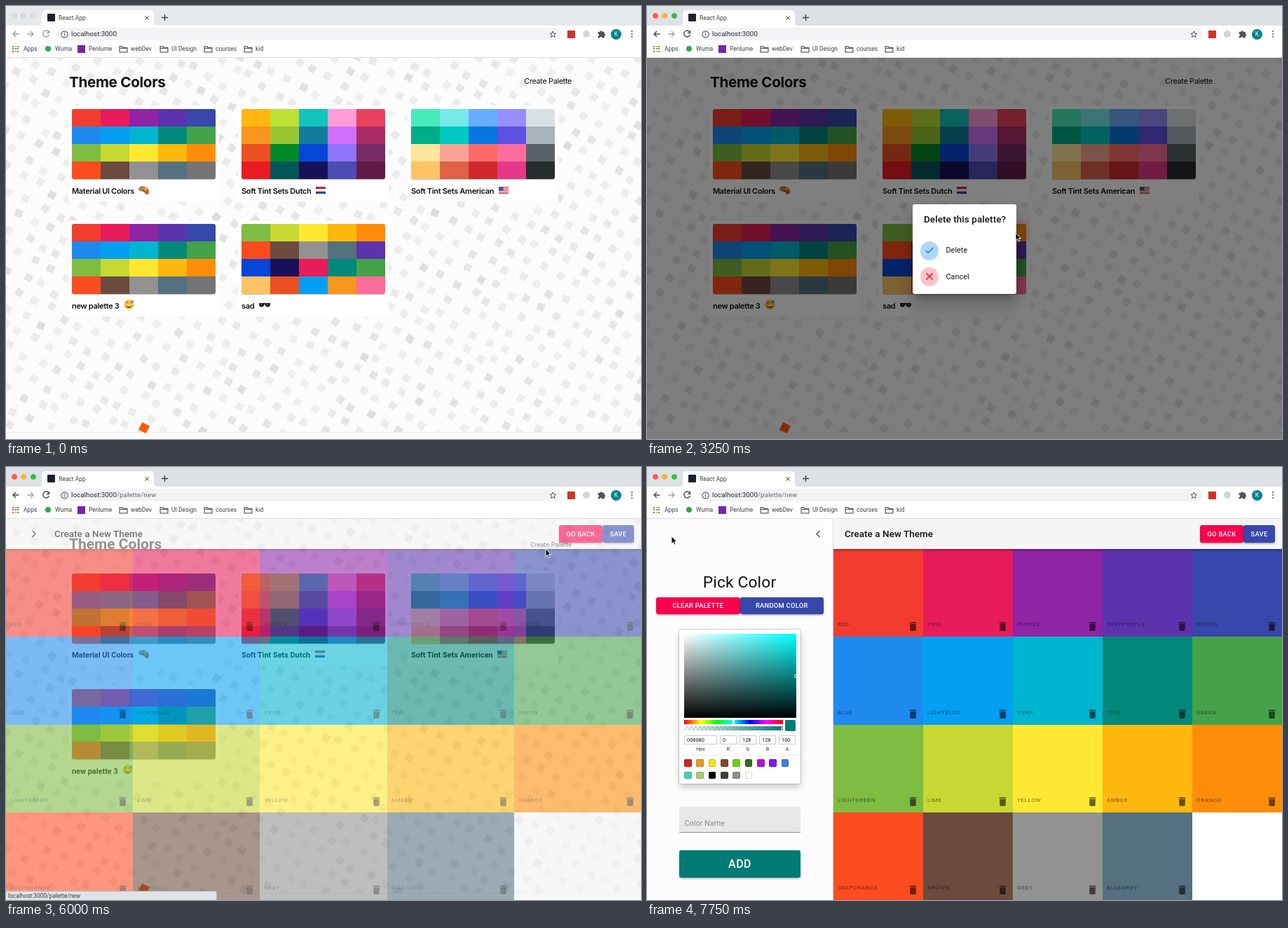
Animation, 906 px wide and 618 px high, one loop 8 s. Source, as an HTML page with a canvas:

```html
<!DOCTYPE html>
<html lang="en">
<head>
<meta charset="utf-8">
<title>Theme Colors</title>
<style>
html, body { margin: 0; width: 100%; height: 100%; overflow: hidden; background: #fff; }
#stage { position: relative; width: 906px; height: 618px; overflow: hidden; font-family: Roboto, sans-serif; color: #111; }
#stage div, #stage svg, #stage canvas { position: absolute; box-sizing: border-box; }
.t { line-height: 20px; height: 20px; white-space: pre; }
.mid { transform: translateX(-50%); }
.full { left: 0; top: 0; width: 906px; height: 618px; }
.btn { color: #fff; border-radius: 3px; text-align: center; font-weight: 500; font-size: 9.33px; letter-spacing: .27px;
  box-shadow: 0 2px 3px -1px rgba(0,0,0,.3), 0 1px 3px rgba(0,0,0,.2); }
.pink { background: #f9004f; }
.indigo { background: #3747ab; }

#bar { background: #e7eaed; }
.lamp { width: 8px; height: 8px; top: 10px; border-radius: 50%; background: #dfe1e4; border: 1px solid #cbcdd0; }
.nav { color: #9a9da1; }
.focus #bar { background: #dee1e6; }
.focus .nav { color: #46494d; }
.focus .lamp { background: var(--c); border-color: var(--c); }

#home { font-family: Inter, sans-serif; letter-spacing: -.02em; }
#home .title { font-size: 20.7px; font-weight: 700; left: 90px; top: 98.5px; }
#home .link { font-size: 10.8px; right: 99px; top: 98px; }
.card { width: 215px; height: 137px; background: #fff; }
.body { left: 0; top: 0; width: 100%; height: 100%; }
.thumb { left: 5px; top: 5px; width: 205px; height: 100px; border-radius: 3px; overflow: hidden; box-shadow: 0 1px 1px rgba(0,0,0,.25); }
.card .t { left: 5px; top: 111.5px; font-size: 11px; font-weight: 600; }
.card .t svg { position: static !important; vertical-align: -2px; margin-left: 3px; }
#home.alt { font-family: Roboto, sans-serif; letter-spacing: 0; }
#home.alt .title { font-size: 21px; top: 100px; }
#home.alt .link { font-size: 9.4px; top: 101px; }
#home.alt .card { margin-top: 5px; }
#home.alt .low { margin-top: 6px; }
#home.alt .card .t { font-size: 10.9px; font-weight: 700; }

#main { top: 74px; right: 0; height: 544px; }
#appbar { left: 0; right: 0; top: 0; height: 43px; background: #f5f5f5; box-shadow: 0 1px 4px rgba(0,0,0,.45); }
#cells { left: 0; right: 0; top: 43px; bottom: 0; display: grid; grid-template: repeat(4, 1fr) / repeat(5, 1fr); }
#cells > div { position: relative !important; }
#cells .t { left: 6px; bottom: 7px; font-size: 8px; letter-spacing: .67px; color: rgba(0,0,0,.52); }
#cells svg { right: 6.5px; bottom: 6.5px; color: rgba(0,0,0,.58); }
</style>
</head>
<body>
<div id="stage"></div>
<script>
const stage = document.getElementById('stage');
const $ = id => document.getElementById(id);

const box = (x, y, w, h, css = '', inner = '', attr = '') =>
  `<div ${attr} style="left:${x}px;top:${y}px;width:${w}px;height:${h}px;${css}">${inner}</div>`;
// y is the middle of the capitals
const text = (x, y, size, str, css = '', cls = '') =>
  `<div class="t ${cls}" style="left:${x}px;top:${y - 10}px;font-size:${size}px;${css}">${str}</div>`;
const svg = (w, h, view, inner, css = '', cls = '') =>
  `<svg class="${cls}" width="${w}" height="${h}" viewBox="0 0 ${view}" style="${css}">${inner}</svg>`;
const at = (x, y, s) => `left:${x - s / 2}px;top:${y - s / 2}px;`;
const fill = (x, y, s, d, css = '', cls = '') =>
  svg(s, s, '24 24', `<path fill="currentColor" d="${d}"/>`, at(x, y, s) + css, cls);
const line = (x, y, s, d, css = '', cls = '', w = 2.4) =>
  svg(s, s, '24 24', `<path fill="none" stroke="currentColor" stroke-width="${w}" d="${d}"/>`, at(x, y, s) + css, cls);
const button = (x, y, w, h, str, cls, css = '') =>
  box(x, y, w, h, `line-height:${h}px;${css}`, str, `class="btn ${cls}"`);
const hex = s => s.split(' ').map(c => '#' + c);

const TRASH = 'M6 19c0 1.1.9 2 2 2h8c1.1 0 2-.9 2-2V7H6zM19 4h-3.5l-1-1h-5l-1 1H5v2h14z';
const ARROW = 'M21 12H4M12 4l-8 8 8 8';
const material = hex('f33c30 e81c5a 8f24a5 5d33ad 3747ab 1e8af0 049ff2 00b5d0 02897b 44a348 7fbc42 c8d832 ffe832 ffb80e ff8d0a ff4c1f 6c4b3e 929292 55707f 747474');
const dutch = hex('ffb80f bee033 12c4bc fd9dd9 ea425c f8951c 98c632 127c9e d070f8 aa2c66 ec5022 008a28 0646d8 8e74f8 772c66 e81b22 00555a 181058 4c4cb2 621a46');
const american = hex('48ecba 76eae8 68aeff 988ffe dae1e5 00ad86 00c8c2 0876e0 6050e2 a8b4ba ffe59c f9a594 ff6a68 fd6c9c 576266 fcc464 de6248 d0282a e53886 262b2c');
const mixed = [...material.slice(10, 18), material[18], material[3], dutch[12], dutch[17], material[1], material[8], material[9],
  american[15], dutch[10], material[6], dutch[5], american[13]];
const names = 'red pink purple deeppurple indigo blue lightblue cyan teal green lightgreen lime yellow amber orange deeporange brown grey bluegrey'.split(' ');

const rect = (x, y, w, h, c) => `<rect x="${x}" y="${y}" width="${w}" height="${h}" fill="${c}"/>`;
const dot = (x, y, r, c) => `<circle cx="${x}" cy="${y}" r="${r}" fill="${c}"/>`;
const emoji = {
  paint: svg(17, 14, '17 14', '<path d="M1 4C3 0 10 0 14 4s3 9-1 9-2-4-5-4S0 8 1 4z" fill="#c98a4b"/>' +
    dot(4, 4, 1.5, '#3f9be0') + dot(7.5, 3.3, 1.4, '#4caf50') + dot(11, 5, 1.4, '#f5c928') + dot(13.5, 8, 1.4, '#e2413a') +
    '<path d="M6 6l8 6" stroke="#7a4a20" stroke-width="1.3"/>'),
  nl: svg(16, 14, '16 14', rect(1, 2, 14, 3.4, '#bb2a35') + rect(1, 5.4, 14, 3.3, '#f4f4f4') + rect(1, 8.7, 14, 3.3, '#2a4d96')),
  us: svg(16, 14, '16 14', rect(1, 2, 14, 10, '#f4f0f0') +
    [2, 4.4, 6.8, 9.2, 11].map(y => rect(1, y, 14, 1.2, '#d04a52')).join('') + rect(1, 2, 6.5, 5.4, '#3f5590')),
  sweat: svg(17, 16, '17 16', dot(8.5, 8, 7.2, '#fcc934') + '<path d="M4 9h9c0 5-9 5-9 0z" fill="#7a3a18"/>' + rect(5, 9, 7, 1.5, '#fff') +
    '<path d="M4 6l2-1.4L7.4 6M10 6l1.5-1.4L13 6" fill="none" stroke="#5c3a12"/>' + dot(13.6, 3.6, 1.9, '#58aef0')),
  shades: svg(18, 14, '18 14', '<path d="M1 4h16v2c0 5-7 5-7.5 0h-1C8 11 1 11 1 6z" fill="#222"/><path d="M3 5.5l2 1.5M12 5.5l2 1.5" stroke="#888"/>')
};

function chrome() {
  const folder = (x, str) =>
    line(x + 5.5, 61, 13, 'M2 5h7l2 3h11v12H2zM2 10h20', 'color:#5f6368') + text(x + 16, 61, 8.5, str);
  const grid = ['#e8453c', '#4285f4', '#34a853', '#fbbc04'];
  let apps = '';
  for (let i = 0; i < 9; i++)
    apps += box(9 + i % 3 * 3.6, 56.5 + Math.floor(i / 3) * 3.6, 2.3, 2.3, `background:${grid[(i * 3 + (i / 3 | 0)) % 4]}`);
  return box(0, 0, 906, 74, 'background:#fff;border-bottom:1px solid #dcdee1') + box(0, 0, 906, 28, '', '', 'id="bar"') +
    ['#fb5a51', '#f9b42b', '#30c03d'].map((c, i) => `<div class="lamp" style="left:${8 + i * 13.3}px;--c:${c}"></div>`).join('') +
    svg(172, 23, '172 23', '<path fill="#fff" d="M0 23q6 0 6-6V6q0-6 6-6h148q6 0 6 6v11q0 6 6 6z"/>', 'left:45px;top:6px') +
    box(59, 11, 11, 11, 'background:#1d2229;border-radius:1px') + text(75, 16.5, 8.5, 'React App', 'color:#3c4043') +
    line(200.5, 16.5, 8, 'M4 4l16 16M20 4L4 20', 'color:#3c4043', '', 3) + line(226, 16.5, 11, 'M12 2v20M2 12h20', 'color:#3c4043', '', 3) +
    line(14, 40, 12, ARROW, '', 'nav', 2.8) + line(35, 40, 12, ARROW, 'transform:scaleX(-1);color:#a0a3a7', '', 2.6) +
    line(57, 40, 12, 'M20 6a9 9 0 1 0 1 8M21 2v7h-7', '', 'nav', 2.8) +
    box(74, 31, 719, 18, 'background:#f1f3f4;border-radius:9px') +
    line(83.5, 40, 11, 'M12 2a10 10 0 1 0 .1 0M12 11v6M12 6v3', 'color:#5f6368') +
    text(93, 40, 9.9, 'localhost:3000<span id="path" style="color:#6a6e73">/palette/new</span>', 'color:#26282b') +
    line(780, 40, 10.5, 'M12 2l3 7 7 .7-5.4 4.7L18.3 22 12 18l-6.3 4 1.700-7.6L2 9.7 9 9z', 'color:#4a4d51', '', 2.2) +
    box(801, 34.5, 11, 11, 'background:#cf3329') + box(823, 35, 10, 10, 'background:#d4d4d4;border-radius:50%') +
    fill(849, 40, 13, 'M20 11V7q0-2-2-2h-4a2.5 2.5 0 0 0-5 0H5Q3 5 3 7v4a2.7 2.7 0 0 1 0 5.4V21h5a2.7 2.7 0 0 1 5.4 0H18q2 0 2-2v-3a2.5 2.5 0 0 0 0-5z', 'color:#505357') +
    box(863, 32.5, 15, 15, 'background:#02828f;border-radius:50%') + text(870.5, 40, 8.5, 'K', 'color:#fff', 'mid') +
    [36, 40, 44].map(y => box(891.5, y - 1, 2, 2, 'background:#505357;border-radius:50%')).join('') +
    `<div style="color:#3c4043">` + apps + text(25, 61, 8.5, 'Apps') +
    box(56, 56.5, 8, 8, 'background:#35a554;border-radius:50%') + text(70, 61, 8.5, 'Wuma') +
    box(102, 56, 11, 11, 'background:#7a22b0') + text(118, 61, 8.5, 'Penlume') +
    folder(162, 'webDev') + folder(220, 'UI Design') + folder(283, 'courses') + folder(340, 'kid') + '</div>';
}

function card(x, y, name, icon, colors, attr = '', extra = '') {
  const tiles = colors.map((c, i) => box(i % 5 * 41, (i / 5 | 0) * 25, 41, 25, `background:${c}`)).join('');
  return `<div class="card ${y > 200 ? 'low' : ''}" style="left:${x}px;top:${y}px"><div class="body" ${attr}>` +
    `<div class="thumb">${tiles}</div><div class="t">${name} ${emoji[icon]}</div>${extra}</div></div>`;
}

function home() {
  const bin = box(188, 0, 27, 27, 'background:#f5403c', fill(13.5, 13.5, 14, TRASH, 'color:#fff'), 'id="bin"');
  return '<div id="home" class="full"><canvas id="confetti" width="906" height="618"></canvas>' +
    '<div class="t title">Theme Colors</div><div class="t link">Create Palette</div>' +
    card(89, 142, 'Material UI Colors', 'paint', material) +
    card(331, 142, 'Soft Tint Sets Dutch', 'nl', dutch) +
    card(573, 142, 'Soft Tint Sets American', 'us', american) +
    card(89, 306, 'new palette 3', 'sweat', material) +
    card(331, 306, 'sad', 'shades', mixed, 'id="sad"', bin) + '</div>';
}

function dialog() {
  const row = (y, str, bg, color, d) =>
    box(10.5, y - 13.3, 26.6, 26.6, `background:${bg};border-radius:50%`, line(13.3, 13.3, 16, d, `color:${color}`)) +
    text(47.5, y, 10.7, str, 'letter-spacing:.1px');
  return box(0, 74, 906, 544, 'background:rgba(0,0,0,.5)', '', 'id="shade"') +
    box(379, 283, 148, 128, 'background:#fff;border-radius:3px;box-shadow:0 7px 10px -5px rgba(0,0,0,.3),0 16px 25px 2px rgba(0,0,0,.2)',
      box(0, 48, 148, 37, 'background:#f4f4f4', '', 'id="row"') +
      text(16, 21.5, 13.4, 'Delete this palette?', 'font-weight:500;letter-spacing:.1px') +
      row(66.3, 'Delete', '#b1d8fc', '#1c7fe0', 'M4 12l5 5L20 6') +
      row(103.5, 'Cancel', '#ffc5cb', '#e02f38', 'M5 5l14 14M19 5L5 19'), 'id="dialog"');
}

function picker() {
  const input = (x, w, v, name) =>
    box(x, 383, w, 13, 'border:1px solid #ccc') + text(x + 4, 389.8, 7.4, v) + text(x + w / 2, 402.5, 7.2, name, 'color:#333', 'mid');
  const presets = hex('d2201f e99a1e f6e317 7d4a24 72cd1e 376a1c b512d6 8612f4 3c82dd 46d4b8 adc873 000000 3e3e3e 8f8f8f ffffff');
  return box(46, 232, 173, 220, 'background:#fff;border-radius:3px;box-shadow:0 0 0 1px rgba(0,0,0,.15),0 5px 10px rgba(0,0,0,.2)') +
    box(53, 238, 160, 120, 'background:linear-gradient(to top,#000,transparent),linear-gradient(to right,#fff,transparent),#0ff') +
    box(209.5, 295.5, 5, 5, 'border:1px solid #fff;border-radius:50%') +
    box(53, 361, 141, 6, 'background:linear-gradient(to right,red,#ff0 17%,#0f0 33%,#0ff 50%,#00f 67%,#f0f 83%,red)') +
    box(122, 361, 3, 6, 'background:#fff') +
    box(53, 370, 141, 6, 'background:linear-gradient(to right,transparent,#027a78),repeating-conic-gradient(#ddd 0 25%,#fff 0 50%) 0 0/6px 6px') +
    box(190.5, 370, 3, 6, 'background:#fff;border:.5px solid #777') +
    box(197, 361, 15, 16, 'background:#027a78;border-radius:2px') +
    input(53, 47, '008080', 'Hex') + input(104, 24, '0', 'R') + input(132, 24, '128', 'G') + input(160, 24, '128', 'B') + input(188, 24, '100', 'A') +
    box(46, 411, 173, 1, 'background:#eaeaea') +
    presets.map((c, i) => box(53 + i % 9 * 17.35, i < 9 ? 417 : 434.5, 10.7, 10.7,
      `background:${c};border-radius:2px;box-shadow:inset 0 0 0 1px rgba(0,0,0,.15)`)).join('');
}

function drawer() {
  return box(0, 74, 266, 544, 'background:#fcfcfc;border-right:1px solid #ddd',
    box(0, -74, 266, 618, '',
      line(244, 95.5, 15, 'M15 5l-7 7 7 7', 'color:#555') +
      text(132, 164.5, 22.8, 'Pick Color', 'letter-spacing:.15px', 'mid') +
      button(13, 186, 119.5, 24, 'CLEAR PALETTE', 'pink') + button(132.5, 186, 119.5, 24, 'RANDOM COLOR', 'indigo') +
      picker() +
      box(46, 485, 173, 36.5, 'background:#e8e8e8;border-bottom:1px solid #949494;border-radius:3px 3px 0 0') +
      text(53.5, 508.5, 10.7, 'Color Name', 'color:#8b8b8b;letter-spacing:.1px') +
      button(46, 547, 173, 39, 'ADD', '', 'background:#027a76;font-size:16px;letter-spacing:.45px')), 'id="drawer"');
}

function editor() {
  const cells = names.map((n, i) => `<div style="background:${material[i]}"><div class="t">${n.toUpperCase()}</div>` +
    svg(17, 17, '24 24', `<path fill="currentColor" d="${TRASH}"/>`) + '</div>').join('');
  return '<div id="editor" class="full"><div id="main"><div id="cells">' + cells + '</div><div id="appbar">' +
    `<div id="menu">` + box(23, 5.5, 32, 32, 'background:#dcdcdc;border-radius:50%', '', 'id="halo"') +
    line(39, 21.5, 15, 'M9 5l7 7-7 7', 'color:#222') + '</div>' +
    text(69, 21.8, 13.4, 'Create a New Theme', 'font-weight:500;letter-spacing:.08px', 'heading') + '</div></div>' +
    button(789, 83, 62, 25, 'GO BACK', 'pink') + button(851, 83, 45, 25, 'SAVE', 'indigo') + drawer() + '</div>';
}

function drawConfetti() {
  const g = $('confetti').getContext('2d');
  let seed = 11;
  const rnd = () => (seed = seed * 16807 % 2147483647) / 2147483647;
  const square = (x, y, s, a, c) => {
    g.save(); g.translate(x, y); g.rotate(a); g.fillStyle = c; g.fillRect(-s / 2, -s / 2, s, s); g.restore();
  };
  g.fillStyle = '#fcfcfc';
  g.fillRect(0, 0, 906, 618);
  g.save();
  g.beginPath(); g.rect(0, 74, 906, 534); g.clip();
  const cos = Math.cos(.48), sin = Math.sin(.48);
  for (let i = -15; i < 50; i++) for (let j = -20; j < 32; j++) {
    const u = i * 25 + rnd() * 10, v = j * 25 + rnd() * 10;
    square(u * cos - v * sin, u * sin + v * cos, 10.5, .4 + rnd() * .25, `rgba(0,0,0,${.05 + rnd() * rnd() * .08})`);
  }
  g.restore();
  g.fillStyle = '#ececec';
  g.fillRect(0, 608, 906, 1);
  square(197, 602, 12, .48, '#ff5a08');
}

stage.innerHTML = home() + editor() + dialog() +
  box(-1, 605, 302, 14, 'background:#dfe2e6;border:1px solid #b9bcc0;border-radius:0 3px 0 0', text(3, 6.3, 8.4, 'localhost:3000/palette/new', 'color:#3c4043'), 'id="status"') +
  chrome() +
  '<svg id="cursor" width="12" height="16" viewBox="-1 -1 12 16" style="left:-1px;top:-1px"><path d="M0 0v10.5l2.4-2.2 1.7 3.800 1.8-.8-1.700-3.700h3.3z" fill="#000" stroke="#fff" stroke-width=".9"/></svg>';
drawConfetti();

// time, x, y of the pointer tip
const track = [[250, 808, 2], [500, 570, 106], [750, 570, 106], [1750, 556, 292], [2000, 556, 292], [2250, 515, 325], [2500, 531, 320],
  [3000, 531, 320], [3250, 526, 324], [3750, 480, 352], [4250, 487, 356], [4500, 489, 353], [5250, 770, 113], [6000, 770, 117], [6250, 600, 113],
  [6750, 60, 101], [7000, 35, 99], [8000, 35, 99]];
const clamp = v => Math.max(0, Math.min(1, v));
function pointer(t) {
  const i = Math.max(1, track.findIndex(p => p[0] >= t));
  const [a, b] = [track[i - 1], track[i]];
  const k = clamp((t - a[0]) / (b[0] - a[0]));
  return [a[1] + (b[1] - a[1]) * k, a[2] + (b[2] - a[2]) * k];
}

const show = (el, o) => { el.style.opacity = o; el.style.visibility = o > 0 ? 'visible' : 'hidden'; };
const heading = document.querySelector('.heading');

function render(ms) {
  const t = Math.floor(ms % 8000 / 250) * 250; // four pictures a second
  const ramp = (a, b) => clamp((t - a) / (b - a));
  const page = ramp(5870, 6095);
  const open = 1 - (1 - ramp(7420, 7645)) ** 3;
  const [x, y] = pointer(t);

  stage.classList.toggle('focus', t >= 1000);
  $('path').style.display = t >= 5500 ? '' : 'none';
  $('cursor').style.transform = `translate(${x}px,${y}px)`;
  show($('cursor'), t >= 250 ? 1 : 0);
  show($('status'), t >= 5250 && t < 6250 ? 1 : 0);

  $('home').classList.toggle('alt', t >= 6000);
  show($('home'), page < 1 ? 1 : 0);
  // the card's white backing stays solid until its content is gone
  const gone = ramp(4100, 4435);
  $('sad').style.opacity = 1 - gone;
  $('sad').parentNode.style.display = gone < 1 ? '' : 'none';
  $('bin').style.opacity = ramp(2100, 2400) - ramp(2900, 3300);
  show($('shade'), ramp(2600, 2825) - ramp(4075, 4275));
  show($('dialog'), ramp(2600, 2825) - ramp(4075, 4257));
  $('row').style.opacity = t >= 3500 ? 1 : 0;

  $('editor').style.opacity = page;
  $('editor').style.display = page > 0 ? '' : 'none';
  $('main').style.left = 266 * open + 'px';
  $('main').style.background = open ? '#fdfdfd' : '#f5f5f5';
  $('drawer').style.transform = `translateX(${-266 * (1 - open)}px)`;
  $('menu').style.display = open ? 'none' : '';
  $('halo').style.opacity = t >= 7000 ? 1 : 0;
  heading.style.left = (open ? 16 : 69) + 'px';
}

const start = performance.now();
function tick() {
  render(performance.now() - start);
  requestAnimationFrame(tick);
}
render(0);
requestAnimationFrame(tick);
</script>
</body>
</html>
```
